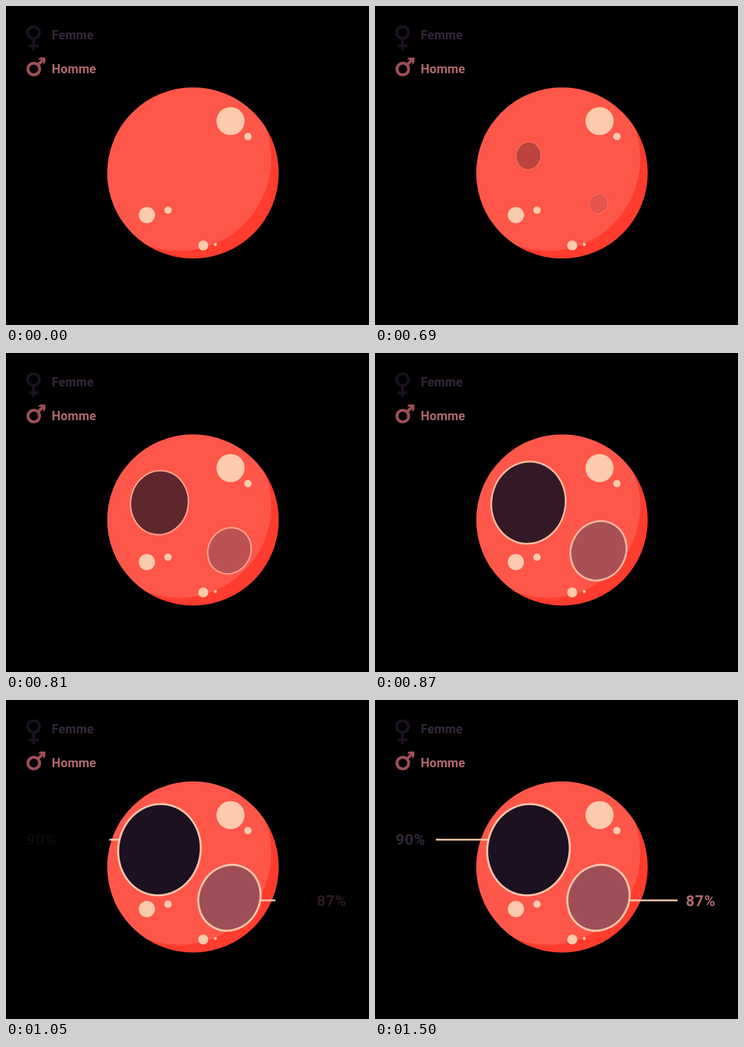
Write an HTML page that moves like this. It is 738 by 650 pixels and loops after 2700 ms.

```html
<!DOCTYPE html>
<html lang="fr">
<head>
<meta charset="utf-8">
<title>Femme / Homme</title>
<style>
  html, body { margin: 0; width: 100%; height: 100%; overflow: hidden; background: #000; }
  svg { display: block; width: 738px; height: 650px; }
  text { font-family: Roboto, "Open Sans", sans-serif; font-weight: 700; }
  .label { font-size: 25.2px; letter-spacing: .2px; }
  .value { font-size: 30.5px; letter-spacing: 1.1px; }
  .cream { fill: #fccaad; }
  .dark { fill: #32273a; }
  .pink { fill: #b1686d; }

  .spot, .line, .value { animation: 2700ms infinite both; }
  .spot { animation-name: grow; stroke: #fccaad; stroke-width: 4; }
  .line { animation-name: extend; }
  .value { animation-name: appear; }

  /* 600–900 ms */
  @keyframes grow {
    0% { transform: scale(0); opacity: 0; }
    22.2% { transform: scale(0); opacity: 0; animation-timing-function: steps(10); }
    33.3%, 100% { transform: scale(1); opacity: 1; }
  }
  /* 900–1350 ms */
  @keyframes extend {
    0% { transform: scaleX(0); }
    33.3% { transform: scaleX(0); animation-timing-function: steps(15); }
    49.97%, 100% { transform: scaleX(1); }
  }
  /* 900–1500 ms */
  @keyframes appear {
    0% { opacity: 0; }
    33.3% { opacity: 0; animation-timing-function: steps(20); }
    55.53%, 100% { opacity: 1; }
  }
</style>
</head>
<body>
<svg viewBox="0 0 738 650">
  <defs>
    <clipPath id="disc"><circle cx="380.2" cy="340.2" r="174.3"/></clipPath>
    <clipPath id="crop"><rect x="36" y="40" width="50" height="60"/></clipPath>
  </defs>

  <!-- legend -->
  <g clip-path="url(#crop)" fill="none" stroke="#1b1120" stroke-width="5.8">
    <circle cx="56" cy="54" r="12"/>
    <path d="M56 66V89.5M46 81H66"/>
  </g>
  <g fill="none" stroke="#9f4e57" stroke-width="5.8">
    <circle cx="56.5" cy="128.5" r="11.9"/>
    <path d="M65 120L76.5 108.5"/>
    <path d="M69 105H80V115.5L75.5 119.5V109.5H65Z" fill="#9f4e57" stroke="none"/>
  </g>
  <text class="label dark" x="93" y="68.2">Femme</text>
  <text class="label pink" x="93" y="137.2">Homme</text>

  <!-- sphere -->
  <g clip-path="url(#disc)">
    <rect x="200" y="160" width="360" height="360" fill="#ff3c2e"/>
    <circle cx="352" cy="312" r="187" fill="#ff564a"/>
  </g>
  <g class="cream">
    <circle cx="456.5" cy="234.5" r="28.6"/>
    <circle cx="491.8" cy="266" r="7.5"/>
    <circle cx="286.4" cy="426" r="16.5"/>
    <circle cx="329.4" cy="416" r="7.5"/>
    <circle cx="401" cy="488" r="10.2"/>
    <circle cx="425.5" cy="486" r="3"/>
  </g>

  <!-- leader lines, tucked under the spots -->
  <g class="cream">
    <g transform="translate(253 282.8)"><rect class="line" x="-129.2" width="129.2" height="3.6"/></g>
    <g transform="translate(514.5 406.5)"><rect class="line" width="100.5" height="3.6"/></g>
  </g>

  <g transform="translate(312 305)">
    <g class="spot"><ellipse rx="83.7" ry="93.3" transform="rotate(9.6)" fill="#1b1120"/></g>
  </g>
  <g transform="translate(454.3 403)">
    <g class="spot"><ellipse rx="61.7" ry="68.5" transform="rotate(28)" fill="#9f4e57"/></g>
  </g>

  <text class="value dark" x="42" y="294.8">90%</text>
  <text class="value pink" x="632" y="419.7">87%</text>
</svg>
</body>
</html>
```
